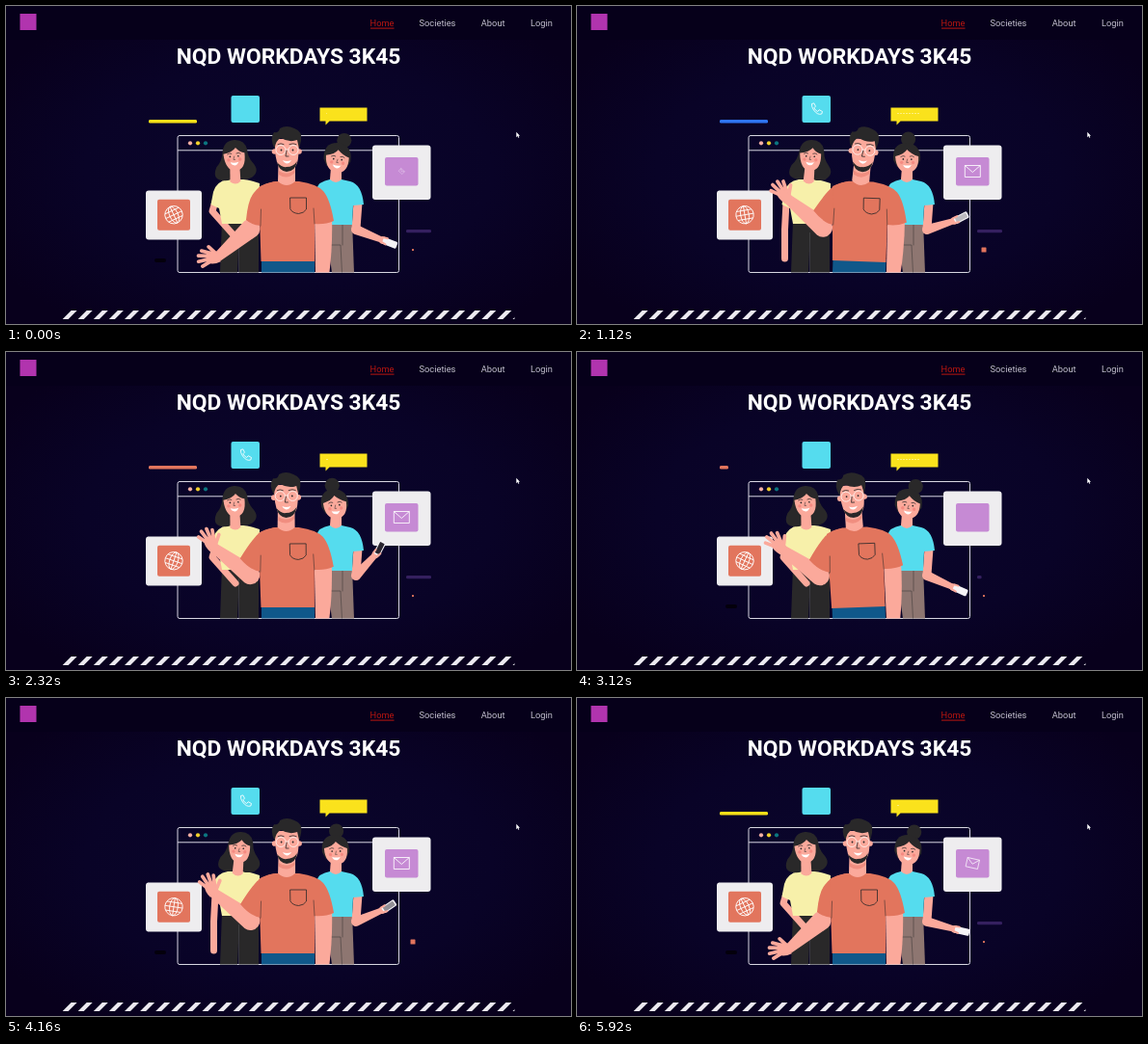
Recreate the animation shown at these times as an HTML page. Size 586 by 330 pixels, loop 6 s.

```html
<!DOCTYPE html>
<html lang="en">
<head>
<meta charset="utf-8">
<title>Workdays</title>
<style>
  html, body { margin: 0; width: 100%; height: 100%; overflow: hidden; background: #06001a; }
  svg { display: block; width: 100vw; height: 100vh; }
  text { font-family: Roboto, Arial, sans-serif; }
  .nav { font-size: 9.3px; fill: #c3c1cd; }
  .skin { fill: #fba99b; }
  .dark { fill: #292829; }
  .shirt { fill: #e2755d; }
  .limb { fill: none; stroke: #fba99b; stroke-linecap: round; stroke-linejoin: round; }
  .ink { fill: none; stroke: #292829; stroke-width: .8; stroke-linecap: round; stroke-linejoin: round; }
  .icon { fill: none; stroke: #fff; stroke-width: .85; stroke-linejoin: round; }
</style>
</head>
<body>
<svg viewBox="0 0 586 330">
  <defs>
    <radialGradient id="night" cx="50%" cy="52%" r="60%">
      <stop offset="0" stop-color="#0a062c"/>
      <stop offset=".6" stop-color="#090327"/>
      <stop offset="1" stop-color="#08001c"/>
    </radialGradient>
    <clipPath id="floor"><rect width="586" height="276.6"/></clipPath>
    <clipPath id="band"><rect x="58.6" y="316" width="468.8" height="9"/></clipPath>
  </defs>
  <rect width="586" height="330" fill="url(#night)"/>
  <rect width="586" height="35" fill="#06001a"/>

  <rect x="14.5" y="8" width="17" height="17" fill="#b134ae"/>
  <g class="nav">
    <text x="377.5" y="20.5" style="fill:#b81510">Home</text>
    <rect x="378" y="22.6" width="24.5" height="1" fill="#b81510"/>
    <text x="428.5" y="20.5">Societies</text>
    <text x="492.8" y="20.5">About</text>
    <text x="544" y="20.5">Login</text>
  </g>
  <text x="293" y="59.7" text-anchor="middle" font-size="22.8" font-weight="700" fill="#fff">NQD WORKDAYS 3K45</text>
  <g id="stripes" fill="#eceaf0" clip-path="url(#band)"></g>

  <!-- window -->
  <g fill="none" stroke="#d8d7e2">
    <rect x="178" y="134.5" width="229.5" height="142" rx="2"/>
    <path d="M178 149.8H407.5"/>
  </g>
  <circle cx="191" cy="142.3" r="2.1" fill="#f6b0a4"/>
  <circle cx="199" cy="142.3" r="2.1" fill="#f4d22b"/>
  <circle cx="207" cy="142.3" r="2.1" fill="#0b7680"/>

  <!-- floating pieces -->
  <rect id="lineLeft" y="118" height="3.6" rx="1.4"/>
  <rect id="lineRight" y="232" height="3.3" rx="1.4"/>
  <rect id="shade" y="262" height="4" rx="2" fill="#04000c"/>
  <rect id="spark" fill="#e2755d" rx=".6"/>
  <path d="M325.5 105.5H374.5V119.5H335.5L331.5 123.5V119.5H325.5Z" fill="#fae21c"/>
  <path id="typing" stroke="#fff5a0" stroke-dasharray="2 1" opacity=".75"/>
  <rect x="233.5" y="93" width="29.5" height="28" rx="2" fill="#55dcee"/>
  <path id="callIcon" class="icon" d="M-5-5L-2.6-5.6L-1-2.2L-2.7-.8Q-1.3 2 1.2 3L2.7 1.2L6 3L5.3 5.5Q1 7-3 1.5Q-5.5-2-5-5Z"/>
  <rect x="145" y="191.5" width="58" height="51" rx="3" fill="#eeedef"/>
  <rect x="157" y="200.8" width="34" height="32" rx="2" fill="#e2755d"/>
  <g id="globe" class="icon">
    <circle r="9.2"/>
    <ellipse rx="4.3" ry="9.2"/>
    <path d="M0-9.2V9.2M-9.2 0H9.2M-7.8-4.6H7.8M-7.8 4.6H7.8"/>
  </g>
  <rect x="380" y="144.5" width="60.5" height="56.5" rx="3" fill="#eeedef"/>
  <rect x="393" y="157" width="34.5" height="29.5" rx="2" fill="#c68ad4"/>
  <path id="mailIcon" class="icon" d="M-8-6H8V6H-8ZM-8-6L0 1L8-6"/>

  <g clip-path="url(#floor)">
    <!-- woman on the left -->
    <path class="dark" d="M224 222H262V277H242L241.5 243L240 277H222Z"/>
    <path d="M241.5 235V277" stroke="#4a494b" stroke-width=".7"/>
    <path id="restArm" class="limb" stroke-width="7"/>
    <path d="M230 180Q218 182 215 193L212.5 206L221 210L224 226H263V184Q252 180 246 180Z" fill="#f7f0aa"/>
    <g id="headLeft">
      <path class="dark" d="M239 139Q228 139 226 152Q225 160 219 166Q213 178 224 180Q232 182 237 177Q245 183 255 179Q264 173 257 164Q252 158 252 150Q250 139 239 139Z"/>
      <path class="skin" d="M233 167H243V182Q238 187 232 182Z"/>
      <path class="skin" d="M227 153Q236 152 240 147Q244 152 249 153Q250 171 238 171Q228 170 227 153Z"/>
      <g id="faceLeft"></g>
    </g>

    <!-- woman on the right -->
    <path d="M335 222H359L361 277H338L334 246Z" fill="#8e7671"/>
    <path d="M335 248H347L348.5 277M349 226V248" class="ink" opacity=".55"/>
    <path class="limb" stroke-width="9" d="M365 204L363 231"/>
    <path d="M336 180Q324 182 322 190L334 227H359L360 207L371 206Q369 185 357 182L348 180Z" fill="#55dcee"/>
    <path class="skin" d="M337 167H348V180Q342 186 336 180Z"/>
    <circle id="bun" class="dark" r="7.6"/>
    <g id="headRight">
      <path class="dark" d="M328 160Q326 143 341 142Q357 143 356 160L352 167H332Z"/>
      <path class="skin" d="M330 156Q339 154 342 149Q347 154 354 156Q355 172 343 173Q331 172 330 156Z"/>
      <g id="faceRight"></g>
    </g>
    <g id="phoneArm">
      <path class="skin" d="M0-5L29-3V3L0 5A5 5 0 0 1 0-5Z"/>
      <circle class="skin" cx="30" r="3.9"/>
      <g id="phone">
        <rect x="-3" y="-3.6" width="15.5" height="7.2" rx="1.5" fill="#f5f3f6"/>
        <rect id="screen" x="-1.5" y="-2.6" width="12.5" height="5.2" rx=".7" fill="#29252f"/>
      </g>
      <path d="M28 2L34 3M30-3L34-3.5" class="limb" stroke-width="2"/>
    </g>

    <!-- man -->
    <g id="man">
      <path class="skin" d="M320 218H338Q339 250 335 280H321Z"/>
      <g id="waveArm">
        <path id="forearm" class="skin"/>
        <g id="hand">
          <path class="skin" d="M-3-4.8Q4-8 10-6Q13 0 10 6Q4 7-3 4.8Z"/>
          <path class="limb" stroke-width="3.7" d="M9-5L16-9M10-2L20-4M10 1.5L20 2M8 4.5L16.5 7M3 5L9 11"/>
        </g>
      </g>
      <rect x="265" y="262" width="55" height="20" fill="#10588a"/>
      <path id="sleeve" class="shirt"/>
      <path class="shirt" d="M279 182Q268 184 262 188L264.5 265H320V226Q331 227 340 223Q336 200 329 192Q323 185 304 182Z"/>
      <path class="ink" d="M264 228L264.5 211M320 226L319 210" opacity=".65"/>
      <path class="ink" d="M295 199H311.5V211Q309 215 303.5 215.5Q297 215 295 211Z"/>
      <g id="headMan">
        <path class="skin" d="M282.5 163H300V182Q291 190 282 182Z"/>
        <path d="M283 171Q291 177 299.500 170V173Q292 181 283 175Z" fill="#f08e80"/>
        <circle class="skin" cx="278.5" cy="151" r="2.8"/>
        <circle class="skin" cx="304" cy="151" r="2.8"/>
        <path class="skin" d="M279 138H304Q304 156 302 163Q299 171 291 171Q283 170 281 162Q278 151 279 138Z"/>
        <path class="dark" d="M281 162Q286 168 291 167Q298 167 302 161Q300 172 291 172Q283 171 281 162Z"/>
        <path class="dark" d="M278.500 148Q273 137 278 131Q283 132 284 127Q291 123 299 127Q308 130 306 140L304 148L302 139Q294 142 285 137Q280 139 278.500 148Z"/>
        <path class="ink" d="M282 143.500Q285 142 288 143.500M294 143.500Q298 142 301 143.500"/>
        <path d="M280 149.500a5 5 0 1 0 10 0a5 5 0 1 0-10 0M293 149.500a5 5 0 1 0 10 0a5 5 0 1 0-10 0M290 149H293" fill="none" stroke="#fff0ed" stroke-width=".9"/>
        <circle class="dark" cx="285.500" cy="149.500" r=".9"/>
        <circle class="dark" cx="297.500" cy="149.500" r=".9"/>
        <path class="ink" d="M291 150L290 156H293" stroke-width=".6"/>
        <path d="M287 160Q291 162 296 160Q294 163.500 291 163.500Q288 163 287 160Z" fill="#fff"/>
      </g>
    </g>
  </g>
  <path d="M529.3 130.8V136.2L530.6 135L531.6 137L532.3 136.5L531.5 134.7H533Z" fill="#fff"/>
</svg>
<script>
const LOOP = 6000, BEAT = 3000, BEAT_DELAY = 150;
const $ = id => document.getElementById(id);
const set = (id, attrs) => {
  for (const name in attrs) $(id).setAttribute(name, attrs[name]);
};
const mix = (a, b, k) => a + (b - a) * k;
const ease = (t, from, to) => {
  const k = Math.min(1, Math.max(0, (t - from) / (to - from)));
  return k * k * (3 - 2 * k);
};
// Rises from a to b, holds, falls from c to d.
const pulse = (t, a, b, c, d) => ease(t, a, b) - ease(t, c, d);

const face = (x, y) => `
  <g transform="translate(${x} ${y}) scale(.85)">
    <path class="ink" d="M-8-3Q-5-5-3-3.5M3-3.5Q6-5 8-3"/>
    <circle class="dark" cx="-5" r="1"/><circle class="dark" cx="5" r="1"/>
    <path class="ink" d="M0 0L-1 4H1" stroke-width=".6" opacity=".7"/>
    <circle cx="-7" cy="4" r="2" fill="#f58b82"/><circle cx="7" cy="4" r="2" fill="#f58b82"/>
    <path d="M-5 7Q0 8.5 5 7Q3 11 0 11Q-4 10.5-5 7Z" fill="#fff"/>
  </g>`;

$('faceLeft').innerHTML = face(238, 156);
$('faceRight').innerHTML = face(342.5, 159);
$('stripes').innerHTML = Array.from({ length: 30 }, (_, i) =>
  `<path d="M${58.6 + i * 16.1} 325l9-9h6l-9 9Z"/>`).join('');

const LINE_COLORS = ['#f5df18', '#2f74f2', '#e2755d', '#d40717'];

// Lines wipe away to the left, then grow back from the right.
function drawLine(id, left, width, t, fill) {
  const regrown = ease(t, 4700, 5500);
  const remaining = 1 - ease(t, 2500, 3350);
  const x = regrown ? left + width * (1 - regrown) : left;
  set(id, { x, width: width * (regrown || remaining), fill });
}

function drawFloating(t, beat) {
  const phase = Math.floor((t + 800) / 1500) % 4;
  drawLine('lineLeft', 148, 50, t, LINE_COLORS[phase]);
  drawLine('lineRight', 415, 26, t, phase === 3 ? LINE_COLORS[2] : '#35205f');

  const shade = 12 * (1 - pulse(t, 200, 700, 2500, 3000) - pulse(t, 4300, 4800, 5300, 5800));
  set('shade', { x: 160 - shade / 2, width: shade });

  const spark = 2 + 3 * pulse(beat, 450, 900, 1100, 1800);
  set('spark', { x: 422 - spark / 2, y: 253 - spark / 2, width: spark, height: spark });

  const typed = 12 * (1 - Math.cos(Math.PI * (t - 120) / 1000));
  set('typing', { d: `M332 111.5h${typed}` });

  const call = pulse(beat, 550, 900, 2350, 2700);
  set('callIcon', { transform: `translate(248.5 106.5) scale(${call})` });
  const mail = pulse(beat, 550, 950, 2700, 2940);
  set('mailIcon', { transform: `translate(410.3 171.5) rotate(${60 * (1 - mail)}) scale(${mail})` });
  set('globe', { transform: `translate(174 216.7) rotate(${-25 * Math.cos(Math.PI * t / BEAT)})` });
}

function drawWomen(beat) {
  const drop = pulse(beat, 400, 800, 1250, 1800);
  const elbow = [mix(214, 215.5, drop), mix(213, 232, drop)];
  const wrist = [mix(238, 215.5, drop), mix(240, 262, drop)];
  set('restArm', { d: `M217 203L${elbow}L${wrist}` });
  set('headLeft', { transform: `translate(${3 * drop} 0) rotate(${mix(-4, 3, drop)} 238 176)` });

  const lift = pulse(beat, 550, 1300, 2200, 2930);
  const bunTurn = mix(20, -8, lift) * Math.PI / 180;
  set('bun', { cx: 342 + 27 * Math.sin(bunTurn), cy: 165 - 27 * Math.cos(bunTurn) });
  set('headRight', { transform: `rotate(${mix(7, -4, lift)} 342 172)` });
  set('phoneArm', { transform: `translate(363 232) rotate(${mix(24, -47, lift)})` });
  set('phone', { transform: `translate(33 0) rotate(${-16 * lift})` });
  set('screen', { opacity: ease(lift, .4, .95) });
}

function drawMan(t) {
  const sway = Math.sin(Math.PI * t / 2000) ** 3;
  const raise = pulse(t, 200, 750, 5350, 5900);
  const wave = Math.cos(Math.PI * t / 1000);
  const angle = mix(139, 217, raise);
  const aim = mix(178, 240 + 8 * wave, raise);
  const reach = mix(45, 48, raise);
  set('man', { transform: `rotate(${2.1 * sway} 291 277)` });
  set('headMan', { transform: `rotate(${3 * sway} 291 180)` });
  set('waveArm', { transform: `translate(253.5 231) rotate(${angle})` });
  set('forearm', { d: `M0-10L${reach}-5V5L0 10A10 10 0 0 1 0-10Z` });
  set('hand', { transform: `translate(${reach} 0) rotate(${aim - angle})` });
  const cuff = [mix(249, 243, raise), mix(222, 214, raise)];
  set('sleeve', { d: `M279 182Q263 185 257 194Q251 201 ${cuff}Q254 227 265 228L270 190Z` });
}

const began = performance.now();
function update() {
  const t = (performance.now() - began) % LOOP;
  const beat = (t + BEAT - BEAT_DELAY) % BEAT;
  drawFloating(t, beat);
  drawWomen(beat);
  drawMan(t);
  requestAnimationFrame(update);
}
update();
</script>
</body>
</html>
```
